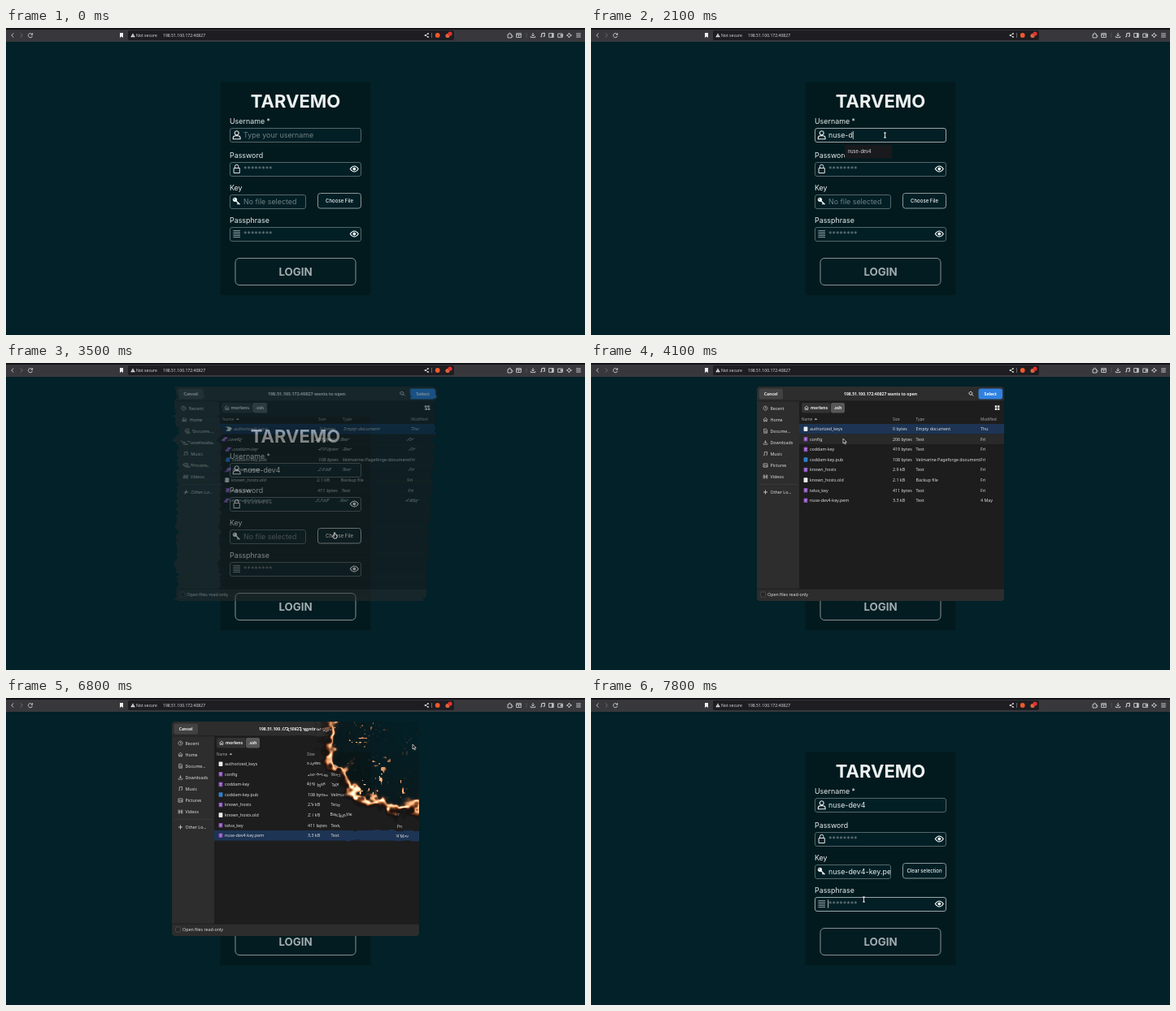
An HTML page with a canvas that plays this animation: 712 by 378 pixels, repeating every 8 s.

```html
<!DOCTYPE html>
<html lang="en">
<head>
<meta charset="utf-8">
<title>Login</title>
<style>
html, body { margin: 0; width: 100%; height: 100%; overflow: hidden; background: #022128; }
canvas { display: block; }
</style>
</head>
<body>
<canvas id="stage" width="712" height="378"></canvas>
<script>
const LOOP = 8000, STEP = 100;
const UI = 'Inter, sans-serif', SYS = '"Noto Sans", "Open Sans", sans-serif';
const HOST = '198.51.100.172:40827', USER = 'nuse-dev4';
const DLG = { x: 204, y: 29, w: 304, h: 264 };

const stage = document.getElementById('stage').getContext('2d');
const layer = new OffscreenCanvas(DLG.w, DLG.h);
const layerCtx = layer.getContext('2d', { willReadFrequently: true });
let g = stage;

const clamp = v => Math.max(0, Math.min(1, v));
const smooth = v => v * v * (3 - 2 * v);

// Drawing helpers; text is placed by its vertical centre.
function text(s, x, y, size, color, { font = UI, weight = 400, align = 'left' } = {}) {
  g.font = `${weight} ${size}px ${font}`;
  g.textAlign = align;
  g.fillStyle = color;
  g.fillText(s, x, y + size * 0.36);
  return g.measureText(s).width;
}
function box(x, y, w, h, r, fill, stroke, line = 1) {
  g.beginPath();
  g.roundRect(x, y, w, h, r);
  if (fill) { g.fillStyle = fill; g.fill(); }
  if (stroke) { g.strokeStyle = stroke; g.lineWidth = line; g.stroke(); }
}
function icon(x, y, d, color = '#dfe3e4', line = 0.8, fill) {
  g.save();
  g.translate(x, y);
  const path = new Path2D(d);
  if (fill) { g.fillStyle = fill; g.fill(path); }
  if (line) { g.strokeStyle = color; g.lineWidth = line; g.stroke(path); }
  g.restore();
}
function dot(x, y, r, color) {
  box(x - r, y - r, 2 * r, 2 * r, r, color);
}

// Value noise
function hash(x, y) {
  const s = Math.sin(x * 127.1 + y * 311.7) * 43758.5453;
  return s - Math.floor(s);
}
function noise(x, y) {
  const i = Math.floor(x), j = Math.floor(y), u = smooth(x - i), v = smooth(y - j);
  const a = hash(i, j), b = hash(i + 1, j), c = hash(i, j + 1), d = hash(i + 1, j + 1);
  return a + (b - a) * u + (c - a) * v + (a - b - c + d) * u * v;
}

const HOUSE = 'M-2.5 0L0-2.5L2.5 0M-1.8-.5V2.3H-.6V.5H.6V2.3H1.8V-.5';

function browser() {
  box(0, 0, 712, 17, 0, '#38383c');
  box(0, 0, 712, 2, 0, '#121216');
  box(150, 3, 401, 12, 2, '#1d1d22');
  icon(8, 9, 'M1.3-2.5L-1.3 0L1.3 2.5');
  icon(19, 9, 'M-1.3-2.5L1.3 0L-1.3 2.5', '#77777c');
  icon(30, 9, 'M2.3-1A2.6 2.6 0 1 0 2.5 .8M2.6-2.8V-.8H.6');
  icon(142, 9, 'M-2-3H2V3L0 1.4L-2 3Z', '', 0, '#eee');
  icon(156, 9, 'M0-2.5L2.7 2.3H-2.7Z', '', 0, '#eee');
  icon(156, 9, 'M0-.8V.8M0 1.2V1.8', '#1d1d22', 0.6);
  text('Not secure', 160, 9.3, 5.1, '#d6d6da', { font: SYS });
  text(HOST, 193, 9.3, 5.1, '#d6d6da', { font: SYS });
  icon(517, 9, 'M2-2L-1.5 0L2 2');
  for (const [x, y] of [[519, 7], [515.5, 9], [519, 11]]) dot(x, y, 0.9, '#ddd');
  icon(523.5, 9, 'M0-3V3', '#999', 0.6);
  dot(530.7, 9, 2.9, '#f0592b');
  dot(543, 9.5, 2.6, '#d9663f');
  dot(546, 7, 2.6, '#e5322d');
  icon(619.5, 9.3, 'M-2.5-1.5H-.8A1 1 0 1 1 .8-1.5H2V0A1 1 0 1 1 2 1.5V2.7H-2.5Z');
  icon(630.5, 9, 'M-2.8-2.3H2.8V2.5H-2.8ZM-2.8-.8H2.8M0-.5V1.5');
  icon(640, 9, 'M0-3V3', '#666', 0.6);
  icon(648, 9, 'M0-3V1M-1.7-.7L0 1L1.7-.7M-2.7 1V2.6H2.7V1');
  icon(660, 9, 'M-1.3 1.7V-2.2L2.3-2.8V1.2M-2.8 1.8H-1.3M.8 1.3H2.3', '#ddd', 1);
  icon(670.5, 9, 'M-2.8-2.4H2.8V2.4H-2.8ZM1-2.4V2.4M1.9-2V2');
  icon(681.5, 9, 'M-2.8-2H2.8V2.4H-2.8ZM.6-.5H2.8V1H.6Z');
  icon(692.5, 9, 'M0-3Q.4-.4 3 0Q.4 .4 0 3Q-.4 .4-3 0Q-.4-.4 0-3Z');
  icon(704, 9, 'M-2.8-2.1H2.8M-2.8 0H2.8M-2.8 2.1H2.8');
}

const LINE = '#53676a', BRIGHT = '#98a6a8', DIM = '#728084', INK = '#e6ebec';

function field(label, y, w, focused) {
  text(label, 275, y - 8, 8.9, INK);
  box(275.5, y + 0.5, w, 17, 2.5, '#011f25', focused ? BRIGHT : LINE);
}
function eye(y) {
  icon(428.3, y, 'M-5 0Q0-7 5 0Q0 7-5 0Z', '#f0f3f3', 1.2);
  dot(428.3, y, 1.9, '#f0f3f3');
}
function caret(x, y) {
  box(x, y - 5, 0.8, 10, 0, '#e0e6e6');
}

const KEY_TIMES = [1500, 1700, 1800, 1900, 2000, 2100, 2200, 2300, 2500];

function page(t) {
  const typed = USER.slice(0, KEY_TIMES.filter(k => t >= k).length);
  const onUser = t >= 1100 && t < 3000, onPass = t >= 7600, chosen = t >= 6700;
  box(0, 0, 712, 378, 0, '#022128');
  box(263.5, 66.5, 185, 262.5, 2, '#021a1e');
  text('TARVEMO', 356, 90, 22, '#eef2f2', { weight: 700, align: 'center' });

  field('Username *', 123, 161, onUser);
  icon(283.7, 132, 'M0-5.2A2.5 2.5 0 1 1-.01-5.2M-4.4 4.7V3.6Q-4.4 .8-1.6 .8H1.6Q4.4 .8 4.4 3.6V4.7Z', '#eef2f2', 1.1);
  const width = text(typed || 'Type your username', 292, 132, 8.9, typed ? INK : DIM);
  if (onUser) caret(typed ? 292 + width : 291.3, 132);

  field('Password', 165, 161);
  icon(283.7, 173.5, 'M-3.6-1H3.6V5H-3.6ZM-2.2-1V-3A2.2 2.2 0 0 1 2.2-3V-1', '#dfe5e5', 1);
  text('********', 292, 173.5, 8.9, DIM);
  eye(173.5);

  field('Key', 205, 93);
  icon(283.5, 213.5, 'M-1.5-1.5L4 3.8M2.2 2L1 3.6', '#f0f3f3', 1.5);
  dot(281.5, 211.3, 2.6, '#f0f3f3');
  dot(280.7, 210.6, 0.7, '#011f25');
  g.save();
  g.beginPath();
  g.rect(276, 205, 92.5, 18);
  g.clip();
  text(chosen ? USER + '-key.pem' : 'No file selected', 292, 213.7, 8.9, chosen ? INK : DIM);
  g.restore();
  box(383.5, 203.5, 53, 18.5, 3, '#011f25', t >= 3000 && t < 7600 ? '#b0bbbc' : '#899799');
  text(chosen ? 'Clear selection' : 'Choose File', 410, 212.8, 6.05, '#eef2f2', { weight: 500, align: 'center' });

  field('Passphrase', 245, 161, onPass);
  icon(283.7, 253.5, 'M-4.3-4H4.3M-4.3-2H4.3M-4.3 0H4.3M-4.3 2H4.3M-4.3 4H4.3', '#a9b3b5', 0.8);
  text('********', 292, 253.5, 8.9, DIM);
  eye(253.5);
  if (onPass) caret(291.3, 253.5);

  box(282, 283.5, 148, 33, 5, '#021c21', '#849294');
  text('LOGIN', 356, 300, 13.3, '#a3acaf', { weight: 700, align: 'center' });

  if (t >= 1500 && t < 2600) {
    box(312, 144, 58, 16.5, 1.5, '#191a1d');
    text(USER, 316, 152.2, 5.6, '#dcdde0');
  }
}

// name, size, type, date, icon colour
const FILES = [
  ['authorized_keys', '0 bytes', 'Empty document', 'Thu', '#eee'],
  ['config', '206 bytes', 'Text', 'Fri', '#8549b5'],
  ['coddam-key', '419 bytes', 'Text', 'Fri', '#8549b5'],
  ['coddam-key.pub', '108 bytes', 'Velmarine Pageforge document', 'Fri', '#2f7fd0'],
  ['known_hosts', '2.9 kB', 'Text', 'Fri', '#8549b5'],
  ['known_hosts.old', '2.1 kB', 'Backup file', 'Fri', '#eee'],
  ['telva_key', '411 bytes', 'Text', 'Fri', '#8549b5'],
  [USER + '-key.pem', '3.3 kB', 'Text', '4 May', '#8549b5']
];
const PLACES = [
  ['Recent', 'M0-2.5A2.5 2.5 0 1 1-.01-2.5M0-1.4V0H1.2'],
  ['Home', HOUSE],
  ['Docume…', 'M-1.8-2.5H1L2-1.4V2.5H-1.8ZM-.8 0H1M-.8 1.2H1'],
  ['Downloads', 'M0-2.6V.8M-1.6-.8L0 .8L1.6-.8M-2.4 1V2.3H2.4V1'],
  ['Music', 'M-1.2 1.6V-2.2L2-2.5V1.2M-2.4 1.8H-1.2M.8 1.4H2'],
  ['Pictures', 'M-2.5-2H2.5V2.2H-2.5ZM-2.2 1.6L-.5-.4L.7 .8L1.5 0L2.3 1.5'],
  ['Videos', 'M-2.3-2.4V2.4M2.3-2.4V2.4M-1.2-2.4V2.4M1.2-2.4V2.4M-1.2 0H1.2']
];
const rowY = i => 81.2 + 12.58 * i;

function dialog(t, cursor) {
  const sys = (s, x, y, o = {}) => text(s, x, y, o.size || 5.3, o.color || '#dedede', { font: SYS, ...o });
  const bold = { weight: 700, size: 5.1, color: '#eee' };
  g = layerCtx;
  g.clearRect(0, 0, DLG.w, DLG.h);
  g.save();
  g.translate(-DLG.x, -DLG.y);
  g.beginPath();
  g.roundRect(DLG.x, DLG.y, DLG.w, DLG.h, 4);
  g.clip();
  box(204, 29, 304, 264, 0, '#2d2d2d');
  box(256, 47, 252, 231, 0, '#1d1d1d');
  box(204, 46.5, 304, 0.7, 0, '#1a1a1a');
  box(204, 277.7, 304, 0.7, 0, '#191919');

  box(206.5, 31.5, 29.5, 13, 2.5, '#424242');
  sys('Cancel', 221.2, 38, { ...bold, align: 'center' });
  sys(HOST + ' wants to open', 356, 38, { ...bold, align: 'center' });
  icon(467.3, 37.6, 'M-.4-2.2A1.9 1.9 0 1 1-.41-2.2M1 1L2.8 2.8', '#eee', 0.9);
  box(476.5, 31.5, 29.5, 13, 2.5, '#3081e0');
  sys('Select', 491.2, 38, { ...bold, color: '#fff', align: 'center' });

  PLACES.forEach(([name, d], i) => {
    const y = 55.6 + 14.07 * i;
    icon(214.5, y, d, '#ccc', 0.7);
    sys(name, 220.5, y);
  });
  box(207, 149.5, 47, 0.6, 0, '#444');
  icon(214.5, 159, 'M-2.5 0H2.5M0-2.5V2.5', '#ccc', 0.9);
  sys('Other Lo…', 220.5, 159);

  box(259, 49, 35.5, 12.5, 2, '#333');
  box(295, 49, 17, 12.5, 2, '#575757');
  icon(265, 55.3, HOUSE, '#ddd', 0.7);
  sys('morlens', 270, 55.2, bold);
  sys('.ssh', 303.5, 55.2, { ...bold, align: 'center' });
  for (const x of [496.7, 499.9]) for (const y of [52.3, 55.5]) box(x, y, 2.5, 2.5, 0.4, '#eee');

  const head = { size: 4.7, color: '#a4a4a4' };
  sys('Name', 259, 69, head);
  icon(276.5, 69, 'M0-1.2L1.9 1H-1.9Z', '', 0, '#aaa');
  sys('Size', 371, 69, head);
  sys('Type', 399.5, 69, head);
  sys('Modified', 479, 69, head);

  const selected = t < 5900 ? 0 : 7;
  FILES.forEach(([name, size, type, date, color], i) => {
    const y = rowY(i), over = cursor.x > 256 && cursor.x < 508 && Math.abs(cursor.y - y) < 6.3;
    if (i === selected) box(256, y - 6.3, 252, 12.6, 0, '#1d3454');
    else if (over) box(256, y - 6.3, 252, 12.6, 0, '#292929');
    box(261.6, y - 2.8, 4.8, 5.6, 0.7, color);
    if (color === '#8549b5') icon(264, y, 'M-1.4-1H1.4M-1.4 .8H1', '#e4d4f2', 0.6);
    sys(name, 269, y);
    sys(size, 371, y);
    sys(type, 399.5, y);
    sys(date, 479, y);
  });
  box(208.6, 282, 6, 6, 1.2, '#262626', '#565656', 0.7);
  sys('Open files read-only', 217, 285.2);
  g.restore();
  g = stage;
}

// Window appears as horizontal brush strokes that settle into place.
function brushIn(p) {
  const k = 1 - p;
  for (let y = 0; y < DLG.h; y++) {
    const n = noise(y / 3, 9.5), m = noise(y / 9, 3.5);
    const left = DLG.x + k * (n * 14 + m * 14 - 4);
    const right = DLG.x + DLG.w + k * (40 - 26 * y / DLG.h + n * 14 - 7);
    g.globalAlpha = p ** 0.75 * (1 - k * 0.35 * m);
    g.drawImage(layer, 0, y, DLG.w, 1, left, DLG.y + y, right - left, 1);
  }
  g.globalAlpha = 1;
}

// Window burns away in a growing circle around the Select button.
function burn(t) {
  const { w, h } = DLG, radius = (t - 6600) * 0.48, drift = t / 130;
  const src = layerCtx.getImageData(0, 0, w, h), out = layerCtx.createImageData(w, h);
  for (let y = 0; y < h; y++) for (let x = 0; x < w; x++) {
    const dist = Math.hypot(x - 289, y - 11), o = (y * w + x) * 4;
    const rough = (noise(x / 16, y / 16) - 0.5) * 20 + (noise(x / 5, y / 5 + drift) - 0.5) * 11;
    const v = radius - dist + rough;
    const heat = clamp((v + 80) / 80);
    const wave = heat > 0 ? (noise(x / 9, y / 7 + drift) - 0.5) * 7 * heat : 0;
    const sx = Math.max(0, Math.min(w - 1, Math.round(x + wave)));
    const sy = Math.max(0, Math.min(h - 1, Math.round(y + wave * 0.6)));
    const s = (sy * w + sx) * 4;
    let glow = Math.exp(-(((v - 3) / 4.5) ** 2)) * (0.45 + 0.8 * noise(x / 6 + 40, y / 6 + drift));
    if (v > 6 && v < 105) {
      const spark = noise(x / 2.6 + 70, y / 2.6 + drift) * (0.55 + 0.5 * noise(x / 13 + 20, y / 13 + drift));
      glow = Math.max(glow, clamp((spark - 0.69) * 6) * (1 - v / 125));
    }
    const burnt = v > 1, keep = burnt ? 0 : 1 - 0.75 * clamp((v + 12) / 12);
    const smoke = burnt ? 0.5 * clamp(1 - v / 110) : 1;
    const fire = [320 * glow, 235 * glow ** 1.35, 185 * glow ** 1.9];
    for (let c = 0; c < 3; c++) {
      const base = burnt ? 18 : src.data[s + c] * keep;
      out.data[o + c] = base + fire[c];
    }
    out.data[o + 3] = burnt ? 255 * Math.max(smoke, clamp(glow * 1.5)) : src.data[o + 3];
  }
  layerCtx.putImageData(out, 0, 0);
}

// time, x, y of the pointer tip
const PATH = [
  [500, 400, 314], [1000, 361, 132], [2500, 361, 132], [3000, 404, 209], [3500, 404, 209],
  [4100, 310, 93], [4900, 300, 157], [5300, 298, 168], [5900, 298, 168], [6500, 490, 37],
  [6600, 490, 37], [6800, 500, 57], [7600, 407, 210], [7800, 335, 248], [LOOP, 335, 248]
];
function pointerAt(t) {
  const i = Math.max(1, PATH.findIndex(p => p[0] > t));
  const [t0, x0, y0] = PATH[i - 1], [t1, x1, y1] = PATH[i];
  const k = smooth(clamp((t - t0) / (t1 - t0)));
  return { x: x0 + (x1 - x0) * k, y: y0 + (y1 - y0) * k };
}
function pointer({ x, y }, onPage) {
  const within = (l, top, r, b) => onPage && x > l && x < r && y > top && y < b;
  if (within(275, 123, 437, 141) || within(275, 165, 420, 183) || within(275, 245, 420, 263)) {
    icon(x + 0.5, y, 'M-1.5-3H1.5M0-3V3M-1.5 3H1.5', '#fff', 0.9);
  } else if (within(383, 203, 437, 222) || within(282, 283, 430, 317)) {
    icon(x, y, 'M-.6 0Q.2-.8 .8 0V2.2L3 3V5L2.2 7H-.8L-2.3 4.4L-1.6 3.8L-.6 4.5Z', '#eee', 0.8, '#111');
  } else {
    icon(x, y, 'M0 0V6L1.4 4.8L2.4 7L3.4 6.5L2.4 4.4H4.3Z', '#eee', 0.7, '#111');
  }
}

function draw(t) {
  const cursor = pointerAt(t);
  const open = t >= 3200 && t < 7600;
  page(t);
  browser();
  if (open) {
    dialog(t, cursor);
    if (t < 4000) brushIn((t - 3100) / 900);
    else {
      if (t > 6600) burn(t);
      g.drawImage(layer, DLG.x, DLG.y);
    }
  }
  if (t >= 500) pointer(cursor, !open || t < 3600);
}

let start, shown = -1;
function frame(now) {
  start ??= now;
  const t = Math.floor((now - start) % LOOP / STEP) * STEP;
  if (t !== shown) draw(shown = t);
  requestAnimationFrame(frame);
}
requestAnimationFrame(frame);
</script>
</body>
</html>
```
